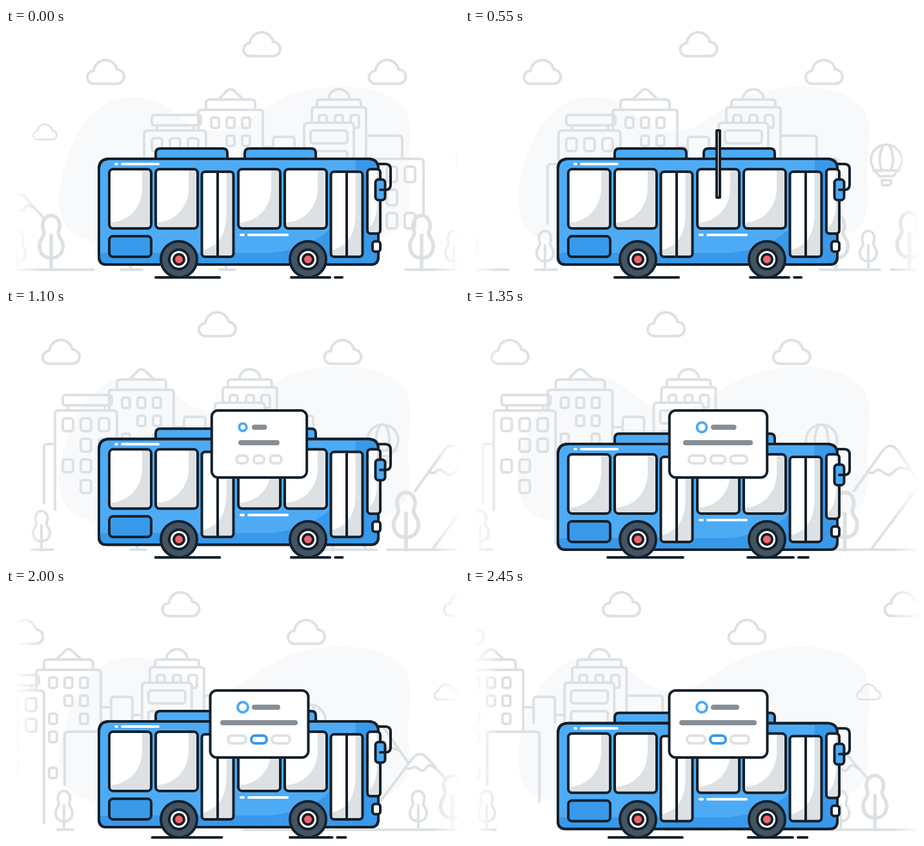
These frames come from a looping animation (702 by 391 pixels, 2.5 s). An HTML page without scripts:

```html
<!DOCTYPE html>
<html lang="en">
<head>
<meta charset="utf-8">
<title>City bus</title>
<style>
@property --bob { syntax: "<number>"; inherits: true; initial-value: 0; }
@property --grow { syntax: "<number>"; inherits: true; initial-value: 0; }

html, body { margin: 0; width: 100%; height: 100%; overflow: hidden; background: #fff; }
svg {
  --ink: #14202b; --sky: #4dabf5; --blue: #3898ea; --pale: #dde1e4;
  display: block; width: 702px; height: 391px;
  animation: bob 2.5s cubic-bezier(.37, 0, .63, 1) infinite;
}

/* Scenery */
.scenery { fill: none; stroke: var(--pale); stroke-width: 4; stroke-linecap: round; stroke-linejoin: round; }
.scenery path, .scenery rect { vector-effect: non-scaling-stroke; }
.clouds, .town { animation: 2.5s steps(50) -6ms infinite; }
.clouds { animation-name: drift; }
.town { animation-name: scroll; }
@keyframes drift { to { transform: translateX(-157px); } }
@keyframes scroll { to { transform: translateX(-314px); } }

/* Bus */
.ink { stroke: var(--ink); stroke-width: 4; stroke-linecap: round; stroke-linejoin: round; }
.body { transform: translateY(calc(var(--bob) * 8px)); }
.shine { stroke: #fff; stroke-width: 4; stroke-linecap: round; }
.shadow rect { fill: var(--ink); y: 385px; height: 4px; rx: 2px; }
.rear { x: calc(230px - var(--bob) * 11px); width: calc(103px + var(--bob) * 18px); }
.front { x: calc(440px - var(--bob) * 4px); width: calc(64px + var(--bob) * 11px); }
.nose { x: calc(508px + var(--bob) * 7px); width: calc(15px + var(--bob) * 4px); }
@keyframes bob {
  0%, 21.333%, 42.667%, 64%, 85.333% { --bob: 0; }
  10.667%, 32%, 53.333%, 74.667%, 96% { --bob: 1; }
  96% { animation-timing-function: ease-in; }
  100% { --bob: .69; }
}

/* Card */
.card { animation: card-show 2.5s step-end infinite; }
.sheet { animation: unfold 2.5s infinite; }
.content { animation: grow 2.5s infinite, content-show 2.5s step-end infinite; }
.content rect { x: calc(var(--mid) - var(--w) / 2); width: var(--w); }
.ring { fill: none; stroke: var(--sky); stroke-width: 4; r: calc(3px + var(--grow) * 5px); }
.bar { fill: #868e96; height: 8px; rx: 4px; }
.bar.title { --w: calc(var(--grow) * 44px); --mid: calc(381px + var(--w) / 2); }
.bar.line { --w: calc(var(--grow) * 120px); --mid: 392px; }
.pill {
  --w: calc(6px + var(--grow) * 22px);
  --mid: calc(392px + var(--side) * (17px + var(--grow) * 17px));
  y: 229px; height: 12px; rx: 6px; fill: #fff; stroke: var(--pale); stroke-width: 4;
}
.pill.pick { --w: calc(8px + var(--grow) * 16px); animation: pick 2.5s infinite; }
@keyframes card-show { 0% { visibility: hidden; } 21.8% { visibility: visible; } }
@keyframes content-show { 0% { visibility: hidden; } 39% { visibility: visible; } }
@keyframes unfold {
  0%, 21.8% { x: 392.5px; width: 0; rx: 0; animation-timing-function: cubic-bezier(.16, 1, .3, 1); }
  67.2%, 100% { x: 316.5px; width: 152px; rx: 10px; }
}
@keyframes grow {
  0%, 39% { --grow: 0; animation-timing-function: cubic-bezier(.16, 1, .3, 1); }
  84.4%, 100% { --grow: 1; }
}
@keyframes pick { 0%, 70% { stroke: var(--pale); } 74%, 100% { stroke: var(--blue); } }
</style>
</head>
<body>
<svg viewBox="0 0 702 391">
  <defs>
    <path id="cloud" d="M-18 0A10 10 0 0 1-18-20A18.2 18.2 0 0 1 18-22A11 11 0 0 1 18 0Z"/>
    <path id="tree" d="M0 0V-38M0-13C-10-13-13-20-13-27C-13-34-7-36-8-42C-12-52-7-60 0-60C7-60 12-52 8-42C7-36 13-34 13-27C13-20 10-13 0-13"/>
    <rect id="wide" x="-8" y="-10" width="16" height="20" rx="4"/>
    <rect id="slim" x="-6" y="-8" width="12" height="16" rx="3"/>
    <rect id="tall" x="-8" y="-12" width="16" height="24" rx="4"/>

    <g id="window">
      <rect width="65" height="92" rx="6" fill="#fff"/>
      <path d="M51 0V28C51 60 30 82 0 83V86Q0 92 6 92H59Q65 92 65 86V6Q65 0 59 0Z" fill="#dde1e4"/>
      <rect class="ink" width="65" height="92" rx="6" fill="none"/>
    </g>
    <g id="door">
      <rect width="49" height="132" rx="5" fill="#fff"/>
      <path d="M38 0V65C38 100 24 116 0 122V127Q0 132 5 132H44Q49 132 49 127V5Q49 0 44 0Z" fill="#dde1e4"/>
      <path class="ink" d="M24.5 0V132"/>
      <rect class="ink" width="49" height="132" rx="5" fill="none"/>
    </g>
    <g id="wheel" class="ink">
      <circle r="28" fill="#435463"/>
      <circle r="15" fill="#fff"/>
      <circle r="8" fill="#f0646a"/>
    </g>

    <linearGradient id="fade-left">
      <stop stop-color="#fff" stop-opacity=".9"/>
      <stop offset="1" stop-color="#fff" stop-opacity=".1"/>
    </linearGradient>
    <linearGradient id="fade-right">
      <stop stop-color="#fff" stop-opacity=".15"/>
      <stop offset="1" stop-color="#fff" stop-opacity=".9"/>
    </linearGradient>
  </defs>

  <path fill="#f8f9fb" d="M195 107C260 107 265 160 325 160C385 160 400 91 520 91C590 91 627 120 627 155C627 190 621 215 624 245C627 275 632 318 560 330L140 331C100 328 82 300 82 265C85 215 115 107 195 107Z"/>

  <g class="scenery">
    <g class="clouds">
      <use href="#cloud" x="154" y="86.5"/>
      <use href="#cloud" x="396" y="43.5"/>
      <use href="#cloud" x="590.5" y="86.5"/>
      <use href="#cloud" x="832.5" y="43.5"/>
    </g>

    <g class="town">
      <g id="block">
        <!-- Ground and trees -->
        <path d="M178 375H211M331 375H355M619 375H712M729 375H1009"/>
        <use href="#tree" x="193" y="375"/>
        <use href="#tree" x="341" y="375"/>
        <use href="#tree" x="694" y="375"/>
        <use href="#tree" x="890" y="375"/>
        <use href="#tree" transform="translate(644 375) scale(1.4)"/>
        <use href="#tree" transform="translate(758 375) scale(1.48)"/>
        <use href="#tree" transform="translate(943 375) scale(1.4)"/>

        <!-- Hills -->
        <path d="M772 284L815 224Q827 206 839 220L875 272M793 253c12 10 12-8 22 0s12 8 20 0s14-6 27 0"/>
        <path d="M800 373L880 266Q892 250 904 264L933 297M872 279c8 6 8-6 16 0s10 6 14 0s8-4 16 2"/>
        <use href="#cloud" transform="translate(933 173) scale(.64)"/>

        <!-- Balloon -->
        <g transform="translate(722 205)">
          <path d="M-24 0A24 24 0 0 1 24 0C24 11 15 19 11 25H-11C-15 19-24 11-24 0ZM-20 16H20M-4-23C-12-12-12 8-6 16M4-23C12-12 12 8 6 16M-7 31H7V35Q7 39 3 39H-3Q-7 39-7 35Z"/>
        </g>

        <!-- Flat-roofed house -->
        <path d="M197 303V217Q197 211 203 211H213M214 313V165Q214 159 220 159H304Q310 159 310 165V365M234 152V158M291 152V158"/>
        <rect x="226" y="135" width="76" height="16" rx="4"/>
        <use href="#wide" x="234" y="181"/><use href="#wide" x="262" y="181"/><use href="#wide" x="290" y="181"/>
        <use href="#wide" x="262" y="213"/><use href="#wide" x="290" y="213"/>
        <use href="#wide" x="234" y="245"/><use href="#wide" x="262" y="245"/>
        <use href="#wide" x="262" y="277"/>

        <!-- Gabled tower -->
        <path d="M298 158V131Q298 127 302 127H394Q398 127 398 131V222M310 126V117Q310 111 316 111H380Q386 111 386 117V126M330 110L343 97Q345 95 348 95T353 97L367 110"/>
        <use href="#slim" x="324" y="147"/><use href="#slim" x="348" y="147"/><use href="#slim" x="372" y="147"/>
        <use href="#slim" x="348" y="175"/><use href="#slim" x="372" y="175"/>
        <use href="#slim" x="324" y="203"/><use href="#slim" x="372" y="203"/>
        <use href="#slim" x="324" y="231"/><use href="#slim" x="324" y="287"/>

        <!-- Low houses -->
        <path d="M342 305V229Q342 223 348 223H417Q423 223 423 229V331M398 185H414M414 209V173Q414 169 418 169H443Q447 169 447 173V209M447 197H462"/>

        <!-- Domed tower -->
        <path d="M474 146V127Q474 123 478 123H554Q558 123 558 127V330M482 122V116Q482 111 487 111H545Q550 111 550 116V122M500 110A16 15 0 0 1 532 110"/>
        <path d="M485 146V139Q485 135 489 135H493Q497 135 497 139V146M510 146V139Q510 135 514 135H518Q522 135 522 139V146M534 146V139Q534 135 538 135H543Q547 135 547 139V151Q547 155 543 155H541"/>
        <path d="M462 330V153Q462 147 468 147H533Q539 147 539 153V330M558 167H609Q614 167 614 172V202"/>
        <rect x="472" y="159" width="57" height="20" rx="4"/>
        <rect x="472" y="191" width="57" height="20" rx="4"/>

        <!-- Corner house -->
        <path d="M558 203H642Q647 203 647 208V290"/>
        <use href="#tall" x="598" y="227"/><use href="#tall" x="626" y="227"/>
        <use href="#tall" x="598" y="263"/>
        <use href="#tall" x="598" y="299"/><use href="#tall" x="626" y="299"/>
      </g>
      <use href="#block" x="-873"/>
    </g>
  </g>

  <path fill="#fff" d="M0 0H16V391H0Z"/>
  <path fill="url(#fade-left)" d="M16 0H52V391H16Z"/>
  <path fill="url(#fade-right)" d="M667 0H702V391H667Z"/>

  <g class="shadow">
    <rect class="rear"/><rect class="front"/><rect class="nose"/>
  </g>

  <g class="body">
    <path class="ink" fill="none" d="M574 211H588Q596 211 596 219V243Q596 251 588 251H580"/>
    <g class="ink" fill="var(--sky)">
      <path d="M232 203V194Q232 187 239 187H336Q343 187 343 194V203Z"/>
      <path d="M370 203V194Q370 187 377 187H473Q480 187 480 194V203Z"/>
      <path id="shell" d="M160 203H561Q577 203 577 219V355Q577 367 565 367H156Q144 367 144 355V219Q144 203 160 203Z"/>
    </g>
    <path fill="var(--blue)" d="M542 203H561Q577 203 577 219V355Q577 367 565 367H156Q144 367 144 355V349H410Q542 335 542 203Z"/>
    <use href="#shell" class="ink" fill="none"/>
    <path class="shine" d="M170 211H172M180 211H236M364 321H368M376 321H436"/>

    <use href="#window" x="160" y="219"/><use href="#window" x="232" y="219"/>
    <use href="#window" x="360" y="219"/><use href="#window" x="432" y="219"/>
    <use href="#door" x="303.5" y="223"/><use href="#door" x="503.5" y="223"/>
    <rect class="ink" x="160" y="323" width="65" height="32" rx="6" fill="var(--blue)"/>

    <rect x="560" y="219" width="20" height="100" rx="5" fill="#fff"/>
    <path fill="var(--pale)" d="M575 221V270Q575 300 561 311V314Q561 319 565 319H575Q580 319 580 314V221Z"/>
    <rect class="ink" x="560" y="219" width="20" height="100" rx="5" fill="none"/>
    <rect class="ink" x="572.5" y="235" width="15" height="32" rx="5" fill="var(--sky)"/>
    <path class="ink" d="M580 251H587"/>
    <rect class="ink" x="568" y="331" width="12" height="16" rx="4" fill="#fff"/>
  </g>
  <use href="#wheel" x="268" y="359"/>
  <use href="#wheel" x="468" y="359"/>

  <g class="card">
    <rect class="sheet ink" y="159" height="104" fill="#fff"/>
    <g class="content">
      <circle class="ring" cx="367" cy="185"/>
      <rect class="bar title" y="181"/>
      <rect class="bar line" y="205"/>
      <rect class="pill" style="--side:-1"/>
      <rect class="pill pick" style="--side:0"/>
      <rect class="pill" style="--side:1"/>
    </g>
  </g>
</svg>
</body>
</html>
```
